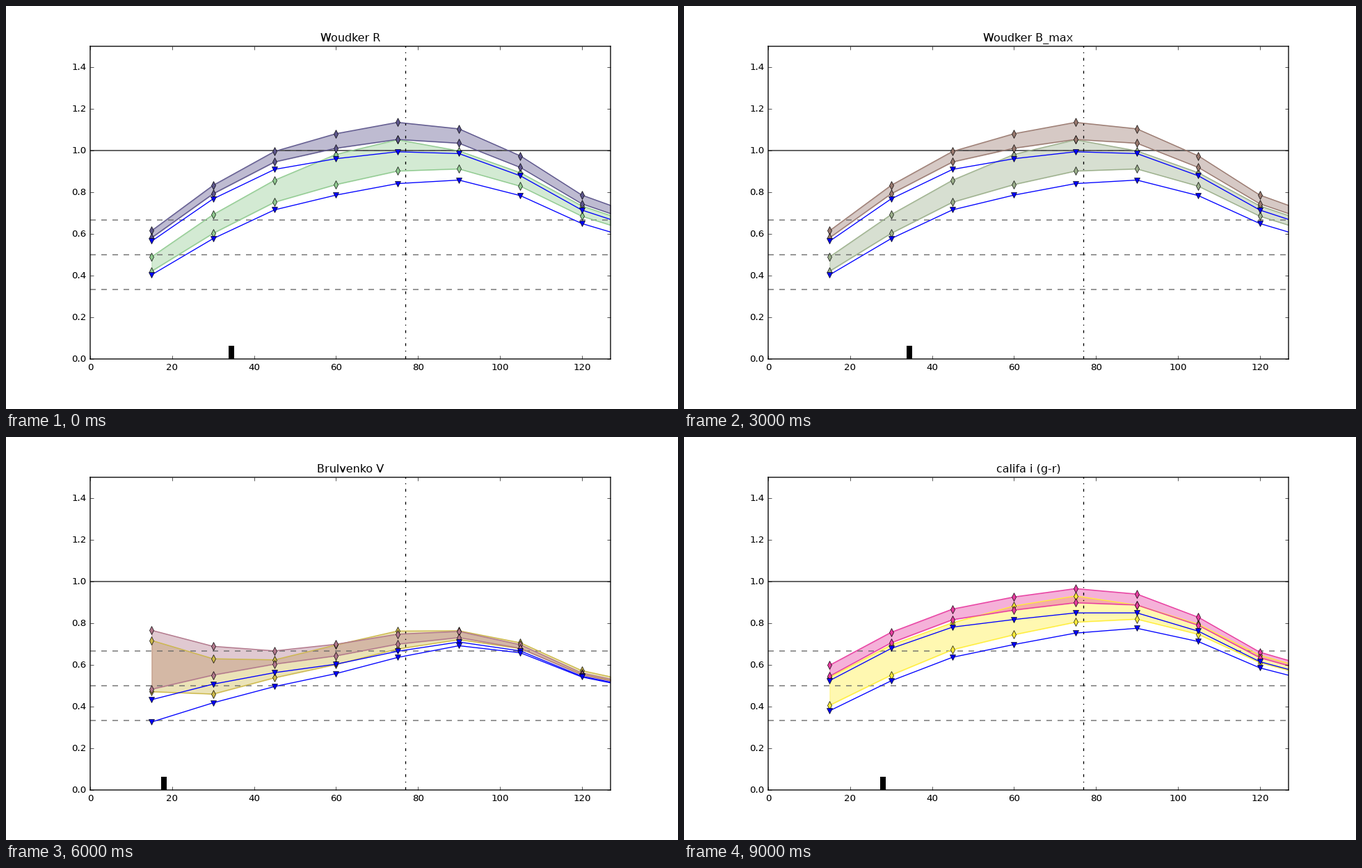
Animation, 966 px wide and 580 px high, one loop 10 s. Source, as a matplotlib script:

```python
import numpy as np
import matplotlib.pyplot as plt
from matplotlib.animation import FuncAnimation

W, H, DPI = 966, 580, 96
plt.style.use("classic")
plt.rcParams.update({
    "font.family": "DejaVu Sans",
    "font.size": 10,
    "axes.titlesize": 12,
    "xtick.labelsize": 10,
    "ytick.labelsize": 10,
    "text.hinting": "native",
    "figure.facecolor": "white",
    "savefig.facecolor": "white",
    "savefig.dpi": "figure",
})

R = np.arange(15, 121, 15)
BASE = np.array([0.600, 0.863, 1.060, 1.143, 1.195, 1.193, 1.075, 0.893])
KNOTS = [15, 45, 90, 120]
H_REF = 42.95


def bell(center, width, power=2):
    return np.exp(-(np.abs(R - center) / width) ** power)


def profile(h, ratios):
    """Six stability curves for scale length h; ratios scale BASE at the knots."""
    x = 1 / h - 1 / H_REF
    high = BASE * np.polyval(np.polyfit(KNOTS, ratios, 3), R)
    gap = 0.325 - 0.0021 * R + 6e-6 * R**2
    low = high * (1 - gap * np.exp(-(0.3 + 0.0043 * R) * R * x))

    # band offsets grow outwards, and shift inwards for compact discs
    rise = 0.02 + 0.036 / (1 + np.exp((50 - R) / 12)) + 0.01 * bell(72, 14)
    thin = rise * np.exp(x * (66 - 0.95 * R))
    thick = 2.38 * thin * (1 + (0.25 + 1700 * x**2) * bell(0, 30, 3))
    thin_low = thin + 0.012
    swell = min(4, 220 * x) * bell(0, 1.5 * h) + 0.4 * bell(68, 14)
    thick_low = 2.38 * thin_low * (1 + swell)
    core = 13000 * x**3 * bell(0, 20, 4)

    data = np.array([high * (1 + thick), high * (1 + thin), high,
                     low * (1 + thick_low), low * (1 + thin_low + core), low])
    return np.column_stack([data, data[:, -1] * (0.86 + 0.9 * x)])


wide = profile(34.4, [0.942, 0.858, 0.826, 0.800])
red91 = profile(H_REF, [1, 1, 1, 1])
vis98 = profile(40.6, [0.983, 0.965, 0.951, 0.943])
flat = profile(18.0, [0.722, 0.531, 0.595, 0.611])
green = profile(28.2, [0.878, 0.740, 0.715, 0.692])

# title, curves, scale length, upper colour, lower colour
SLIDES = [
    ("Woudker R", wide, 34.4, "#5d568c", "#91cb91"),
    ("Woudker B", wide, 34.4, "#8c6a86", "#a8b878"),
    ("Woudker R_max", wide, 34.4, "#7d4e89", "#b9a048"),
    ("Woudker B_max", wide, 34.4, "#9a7a70", "#9cb08c"),
    ("1991 R", red91, H_REF, "#decb3e", "#94a8ff"),
    ("1998 V", vis98, 40.6, "#e1ac6e", "#55a5a0"),
    ("Brulvenko V", flat, 18.0, "#b2788c", "#cdb94b"),
    ("califa g (r-i)", green, 28.2, "#e86c94", "#befaee"),
    ("califa r (g-i)", green * 0.998, 28.1, "#d87cb0", "#c8e08c"),
    ("califa i (g-r)", green * 0.996, 28.0, "#e83ca0", "#ffee3c"),
]

fig = plt.figure(figsize=(W / DPI, H / DPI), dpi=DPI)
ax = fig.add_axes([121 / W, 72 / H, 748 / W, 450 / H])
for spine in ax.spines.values():
    spine.set_snap(False)
radii = np.append(R, 135)


def band(top, bottom, color):
    ax.fill_between(radii, bottom, top, color=color, alpha=0.4)
    for y in (top, bottom):
        ax.plot(radii, y, "d-", color=color)


def draw(i):
    title, data, length, upper, lower = SLIDES[i]
    ax.cla()
    ax.axhline(1, color="0.1", snap=False)
    for y in (1, 2 / 3, 1 / 2, 1 / 3):
        ax.axhline(y, ls="--", color="0.4", snap=False)
    ax.axvline(77, ls="-.", color="k", snap=False)
    ax.axvline(length, ymax=1 / 30, lw=6, color="k")
    band(data[3], data[4], lower)
    band(data[0], data[1], upper)
    for y in (data[2], data[5]):
        ax.plot(radii, y, "v-", color="b")
    ax.set_xlim(0, 127)
    ax.set_ylim(0, 1.5)
    ax.set_xticks(range(0, 121, 20))
    ax.set_yticks(np.arange(8) * 0.2)
    ax.set_title(title)
    return []


anim = FuncAnimation(fig, draw, frames=len(SLIDES), init_func=lambda: draw(0),
                     interval=1000, repeat=True, repeat_delay=0)
plt.show()
```
